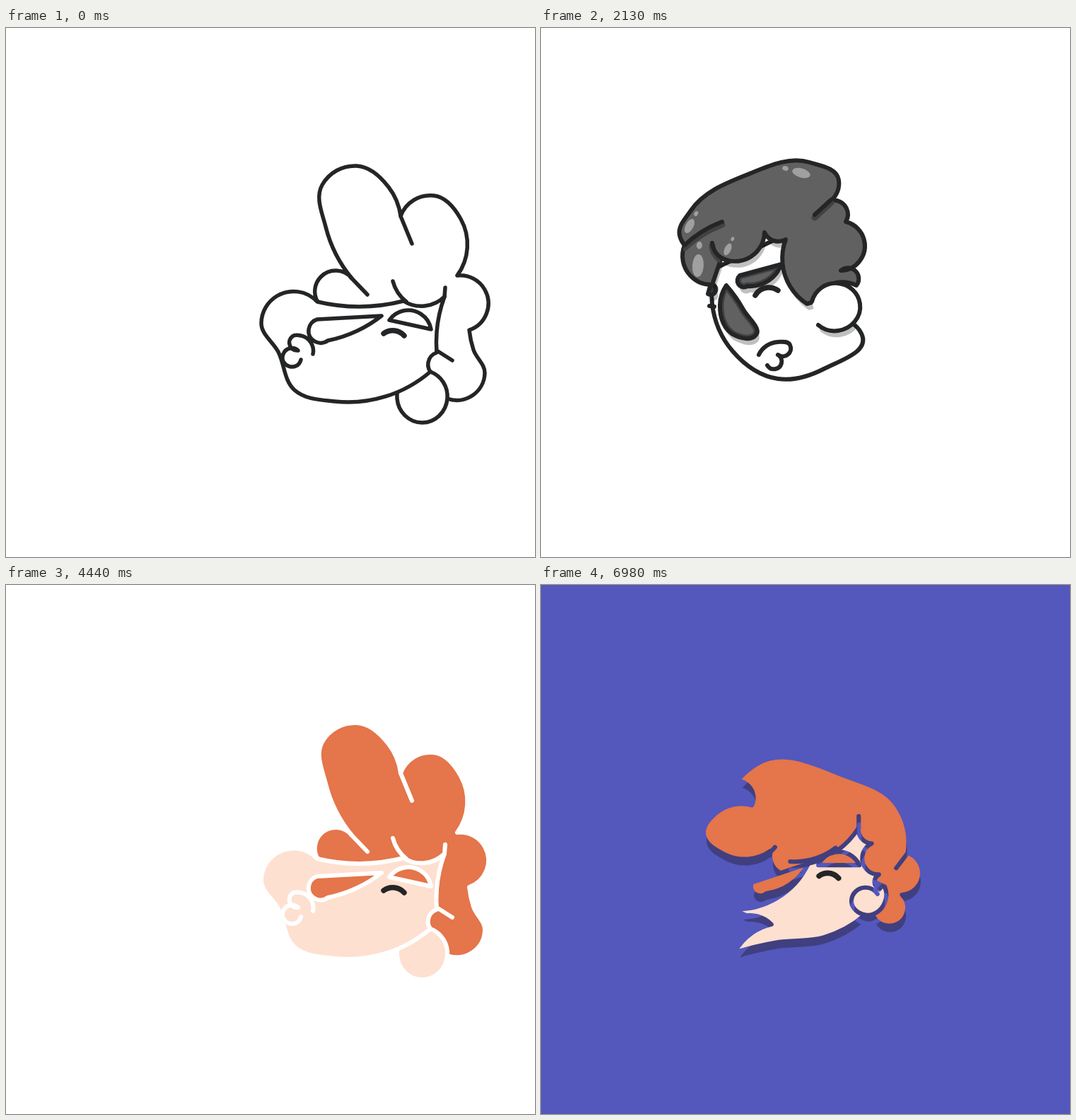
An HTML page with a canvas for the animation above (7080 ms loop, 748 px wide and 748 px high).

```html
<!DOCTYPE html>
<html lang="en">
<head>
<meta charset="utf-8">
<title>Swinging head</title>
<style>
  html, body { margin: 0; width: 100%; height: 100%; overflow: hidden; background: #fff; }
  canvas { display: block; width: 100vw; height: 100vh; }
</style>
</head>
<body>
<canvas id="stage" width="748" height="748"></canvas>
<script>
const SIZE = 748;
const ctx = document.getElementById('stage').getContext('2d');
const sheet = document.createElement('canvas');
sheet.width = sheet.height = SIZE;
const pen = sheet.getContext('2d');

const heading = (a, b) => Math.atan2(b[1] - a[1], b[0] - a[0]);
const wrap = a => Math.atan2(Math.sin(a), Math.cos(a));

// Joins points by near-circular arcs: each tangent is that of the circle through three neighbours.
function arcs(path, pts) {
  const end = pts.length - 1;
  const chord = i => heading(pts[i], pts[i + 1]);
  const tangent = i => {
    if (end === 1) return chord(0);
    if (i === 0) return 2 * chord(0) - tangent(1);
    if (i === end) return 2 * chord(end - 1) - tangent(end - 1);
    return chord(i - 1) + wrap(chord(i) - heading(pts[i - 1], pts[i + 1]));
  };
  for (let i = 0; i < end; i++) {
    const [a, b] = [pts[i], pts[i + 1]];
    const from = tangent(i), to = tangent(i + 1);
    const bend = (Math.abs(wrap(from - chord(i))) + Math.abs(wrap(to - chord(i)))) / 2;
    const reach = Math.hypot(b[0] - a[0], b[1] - a[1]) / (3 * Math.cos(Math.min(bend, 2) / 2) ** 2);
    path.bezierCurveTo(
      a[0] + reach * Math.cos(from), a[1] + reach * Math.sin(from),
      b[0] - reach * Math.cos(to), b[1] - reach * Math.sin(to), b[0], b[1]);
  }
}

// "/" marks a corner, "z" closes the shape.
function trace(text) {
  const path = new Path2D();
  let last;
  for (const part of text.replace('z', '').split('/')) {
    const pts = part.match(/\d+ \d+/g).map(p => p.split(' ').map(Number));
    if (last) pts.unshift(last);
    else path.moveTo(...pts[0]);
    arcs(path, pts);
    last = pts[pts.length - 1];
  }
  if (text.endsWith('z')) path.closePath();
  return path;
}

// Each line of a drawing is a part name followed by its key points.
function pose(x, y, scale, drawing, extra = {}) {
  const parts = drawing.trim().split('\n').map(row => {
    const [, kind, text] = row.trim().match(/^(\w+) (.*)$/);
    return { kind, path: trace(text) };
  });
  return { x, y, scale, parts, glints: [], ...extra };
}

// drift is the move and turn per step away from the home step
const puff = pose(520, 377, 1, `
  hair 440 386 445 352 489 354 / 452 281 447 222 496 195 541 225 558 266 / 605 237 643 270 638 350 / 677 370 655 427 / 661 455 677 488 624 524 / 585 480 / 440 386 z
  skin 600 486 624 524 588 558 553 524 556 506
  face 440 387 383 379 361 417 385 458 408 512 465 528 600 486 / 597 473 609 459 / 609 430 620 380 / 592 393 562 386 / 500 394 440 387 z
  brow 531 407 / 440 412 / 428 426 455 442 / 497 428 531 407 z
  brow 542 413 / 561 400 601 426 z
  line 434 461 417 435 405 436 413 456 / 392 461 417 469
  tail 487 352 511 377
  tail 558 266 574 305
  tail 547 358 554 374 566 387
  tail 621 367 620 380
  tail 609 456 631 470
  eye 534 432 550 428 563 435`,
  { home: 0, drift: [40, 9, 10], glints: [[475, 217, 13], [612, 253, 10]] });

const calm = pose(328, 343, 1, `
  face 246 340 242 390 271 457 335 496 400 482 453 432 438 416 / 440 370 / 350 290 z
  brow 240 362 247 372 236 376 z
  line 238 393 245 394
  hair 203 307 211 350 242 363 / 255 325 / 292 326 316 289 / 330 301 346 299 / 352 365 376 390 / 383 388 / 408 363 446 364 / 446 345 424 343 / 457 300 431 274 / 432 255 410 244 / 421 215 380 190 290 208 212 258 196 293 203 307 z
  skin 383 387 420 361 451 390 420 428 392 420
  brow 262 364 253 392 275 435 302 436 286 398 262 364 z
  brow 340 334 / 281 350 / 279 362 292 365 / 322 357 340 334 z
  line 308 462 335 444 352 448 335 462 / 340 474 320 477
  tail 203 307 226 289 256 274
  tail 410 243 387 264
  tail 242 304 246 316 255 325
  eye 303 378 320 367 335 371`,
  { glints: [[368, 205, 13], [210, 280, 11], [222, 336, 16], [264, 313, 9]] });

const droop = pose(199, 440, 1.02, `
  hair 76 430 92 360 165 303 206 320 / 236 318 249 342 / 283 343 290 384 / 304 395 304 412 / 270 440 / 200 440 / 190 480 / 201 500 170 521 135 497 90 483 76 430 z
  face 145 442 / 189 480 / 190 470 / 225 497 250 550 / 243 571 / 258 560 270 573 / 312 550 320 490 304 443 / 268 405 / 255 400 246 386 / 220 404 185 360 / 145 442 z
  skin 277 411 257 434 281 460 305 430 280 394
  brow 190 471 206 502 218 545 237 540 226 500 190 471 z
  brow 210 402 181 430 186 446 206 425 210 402 z
  line 248 549 258 541 260 528
  line 270 573 268 561 272 542
  line 170 472 173 480 182 478
  tail 183 342 185 361
  tail 250 362 246 386
  tail 107 418 118 464 147 442
  eye 219 433 209 442 208 453`,
  { home: 8, drift: [55, -3, 4], glints: [[112, 348, 13]] });

const smear = pose(385, 388, 1.02, `
  hair 280 279 310 254 428 272 500 312 516 379 / 536 407 508 437 / 515 460 468 466 / 400 390 / 375 397 / 338 406 326 376 / 262 381 233 350 250 324 300 313 / 302 300 280 279 z
  face 448 344 454 361 466 366 / 453 384 476 409 / 471 424 484 430 / 454 467 400 496 335 503 276 517 / 300 490 327 478 / 318 471 275 472 / 293 466 / 273 457 / 334 442 378 394 / 418 376 448 344 z
  brow 378 394 / 300 420 / 302 434 320 435 / 352 423 378 394 z
  brow 392 396 / 415 378 449 396 z
  skin 474 436 457 427 438 444 458 465 484 448 484 426
  tail 448 328 448 344
  tail 353 391 390 386 416 372
  tail 332 371 322 382
  tail 516 379 500 400
  tail 484 426 472 420
  eye 393 411 406 407 420 414`,
  { home: 10, drift: [95, -27, 25], glints: [[310, 266, 12]] });

// The calm head swings from right to left along a sagging arc; the others drift around home.
function place(step) {
  if (step >= 2 && step <= 6) {
    const s = Math.sin((step - 4) * Math.PI / 4);
    return {
      shape: calm,
      x: calm.x - 215 * s + 30 * s * s,
      y: calm.y + 110 * s * s,
      turn: -35 * s - 10 * s * s
    };
  }
  const shape = step < 2 ? puff : step < 9 ? droop : smear;
  const lag = step - shape.home;
  const [dx, dy, turn] = shape.drift;
  return { shape, x: shape.x + lag * dx, y: shape.y + lag * dy, turn: lag * turn };
}

const INK = '#242526', SHADE = '#424242';
const styles = [
  { bg: '#fff', hair: '#fff', skin: '#fff', width: 5.5, ink: true },
  { bg: '#fff', hair: '#616161', skin: '#fff', width: 6, ink: true, shaded: true },
  { bg: '#fff', hair: '#e5754a', skin: '#fee0d0', width: 6 },
  { bg: '#5457bc', hair: '#e5754a', skin: '#fee0d0', width: 6, shadow: '#403f80' }
];
const LOOP = 7080, CYCLES = 8;
const beats = [100, 100, 100, 70, 70, 100, 90, 90, 30, 30, 100];

function locate(time) {
  let t = time % LOOP;
  for (let c = 0; c < CYCLES; c++) {
    const style = styles[c >> 1];
    for (let step = 0; step < beats.length; step++) {
      const slack = style.shaded && beats[step] === 90 ? 10 : 0;
      t -= beats[step] + slack;
      if (t < 0) return { style, step };
    }
  }
}

function clipped(area, draw) {
  pen.save();
  pen.clip(area);
  draw();
  pen.restore();
}

function stroke(path, color, width) {
  pen.strokeStyle = color;
  pen.lineWidth = width;
  pen.stroke(path);
}

function outline(path, style) {
  pen.globalCompositeOperation = style.ink ? 'source-over' : 'destination-out';
  stroke(path, INK, style.width);
  pen.globalCompositeOperation = 'source-over';
}

function castShade(path, face) {
  clipped(face, () => {
    pen.globalCompositeOperation = 'multiply';
    pen.translate(3, 9);
    pen.fillStyle = '#c0c0c0';
    pen.fill(path);
  });
}

// A highlight follows the curve of the head, with a small dot above it.
function drawGlints({ x, y, glints }) {
  pen.fillStyle = '#a0a0a0';
  for (const [gx, gy, r] of glints) {
    const out = Math.atan2(gy - y, gx - x);
    const along = out + (Math.cos(out) < 0 ? Math.PI / 2 : -Math.PI / 2);
    const blob = (far, rx, ry) => {
      pen.beginPath();
      pen.ellipse(gx + far * Math.cos(along), gy + far * Math.sin(along), rx, ry, along, 0, 7);
      pen.fill();
    };
    blob(0, r, r / 2);
    blob(r * 1.8, r / 3, r / 4);
  }
}

function drawHead({ shape, x, y, turn }, style) {
  pen.setTransform(1, 0, 0, 1, 0, 0);
  pen.clearRect(0, 0, SIZE, SIZE);
  pen.translate(x, y);
  pen.rotate(turn * Math.PI / 180);
  pen.scale(shape.scale, shape.scale);
  pen.translate(-shape.x, -shape.y);
  pen.lineCap = pen.lineJoin = 'round';
  const find = kind => shape.parts.find(p => p.kind === kind).path;
  let faced = false;
  for (const { kind, path } of shape.parts) {
    if (kind === 'eye') {
      stroke(path, INK, 7.5);
      continue;
    }
    if (kind !== 'line' && kind !== 'tail') {
      if (style.shaded && faced) castShade(path, find('face'));
      pen.fillStyle = kind === 'hair' || kind === 'brow' ? style.hair : style.skin;
      pen.fill(path);
    }
    if (kind === 'face') faced = true;
    if (style.shaded) {
      if (kind === 'hair') drawGlints(shape);
      if (kind === 'brow') clipped(path, () => stroke(path, SHADE, 11));
      if (kind === 'tail') clipped(find('hair'), () => {
        pen.translate(0, 4);
        stroke(path, SHADE, 9);
      });
    }
    outline(path, style);
  }
}

function render(now) {
  const { style, step } = locate(now);
  drawHead(place(step), style);
  ctx.fillStyle = style.bg;
  ctx.fillRect(0, 0, SIZE, SIZE);
  ctx.save();
  if (style.shadow) {
    ctx.shadowColor = style.shadow;
    ctx.shadowOffsetX = 1;
    ctx.shadowOffsetY = 12;
  }
  ctx.drawImage(sheet, 0, 0);
  ctx.restore();
}

const start = performance.now();
function tick() {
  render(performance.now() - start);
  requestAnimationFrame(tick);
}
tick();
</script>
</body>
</html>
```
